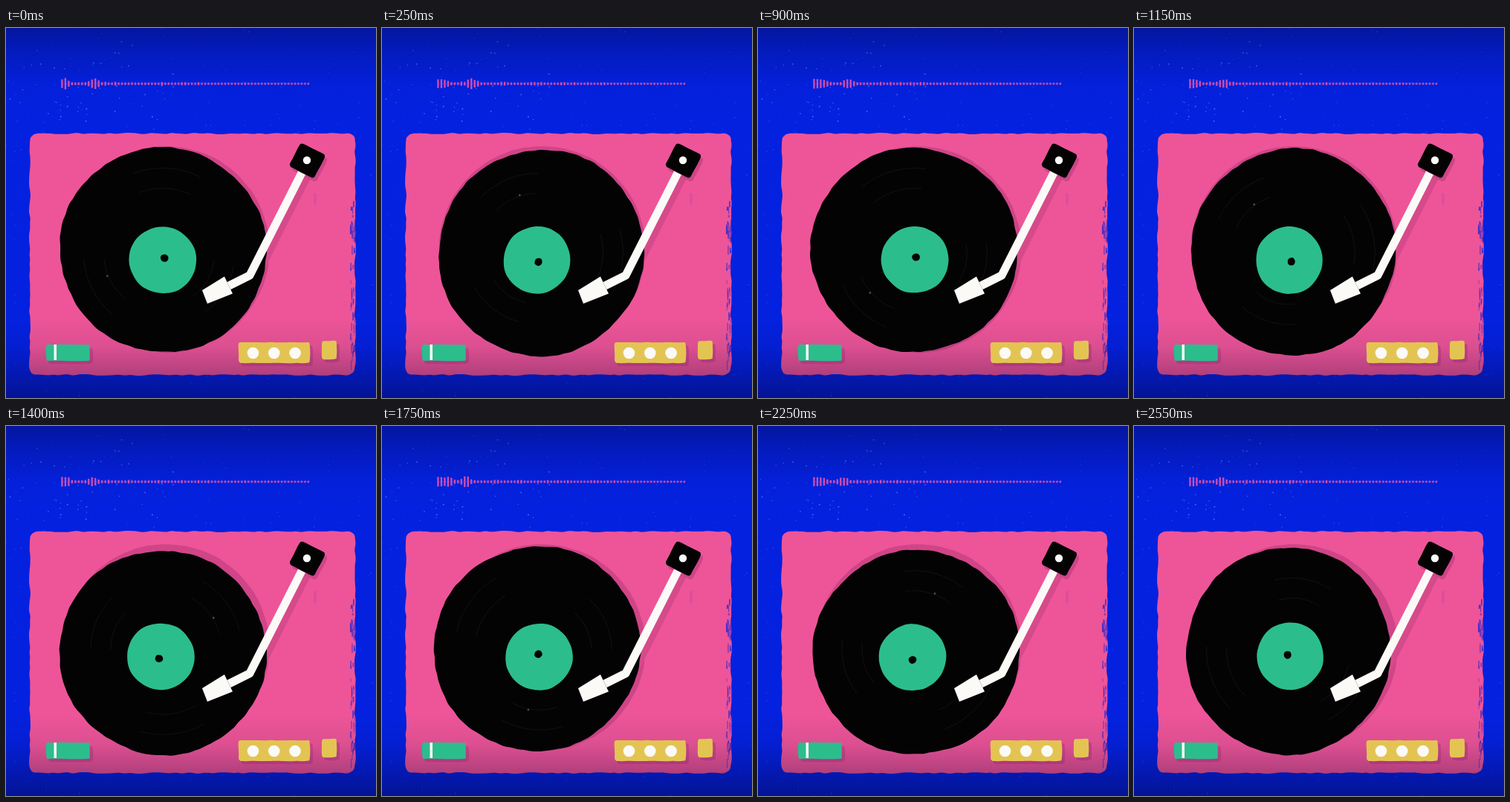
These frames come from a looping animation (498x498 px, 2.6 s). An HTML page with a canvas:

```html
<!DOCTYPE html>
<html lang="en">
<head>
<meta charset="utf-8">
<title>Turntable</title>
<style>
html, body { margin: 0; width: 100%; height: 100%; overflow: hidden; background: #0319a8; }
canvas { display: block; width: 498px; height: 498px; filter: blur(0.5px); }
</style>
</head>
<body>
<canvas id="stage" width="498" height="498"></canvas>
<script>
const SIZE = 498, LOOP = 2600, STEP = 50, TURN = 950, TAU = Math.PI * 2;
const BLUE = '#0421df', PINK = '#ed5598', GREEN = '#2cbd8d', YELLOW = '#e3c453';
const WHITE = '#fbfaf7', BLACK = '#040304', SHADE = 'rgba(130,25,105,.28)';
const ctx = document.getElementById('stage').getContext('2d');

function makeRandom(seed) {
  return () => {
    seed = (seed * 1664525 + 1013904223) >>> 0;
    return seed / 4294967296;
  };
}

function hash(a, b) {
  const v = Math.sin(a * 12.9898 + b * 78.233) * 43758.5453;
  return v - Math.floor(v);
}

function layer(paint) {
  const canvas = document.createElement('canvas');
  canvas.width = canvas.height = SIZE;
  paint(canvas.getContext('2d'));
  return canvas;
}

// Fills a closed curve running through the midpoints of the given points.
function fillCurve(c, points, color) {
  const mid = (p, q) => [(p[0] + q[0]) / 2, (p[1] + q[1]) / 2];
  c.fillStyle = color;
  c.beginPath();
  c.moveTo(...mid(points[points.length - 1], points[0]));
  points.forEach((p, i) => c.quadraticCurveTo(...p, ...mid(p, points[(i + 1) % points.length])));
  c.fill();
}

// Hand-cut rounded box: corner arcs joined by slightly uneven edges.
function roughBox(x, y, w, h, r, jitter, seed) {
  const rnd = makeRandom(seed), corners = [], out = [];
  for (let i = 0; i < 4; i++) {
    const cx = i === 0 || i === 3 ? x + w - r : x + r;
    const cy = i < 2 ? y + h - r : y + r;
    for (let k = 0; k <= 3; k++) {
      const a = (i + k / 3) * TAU / 4;
      corners.push([cx + Math.cos(a) * r, cy + Math.sin(a) * r]);
    }
  }
  corners.forEach(([px, py], i) => {
    const [nx, ny] = corners[(i + 1) % corners.length];
    const n = Math.max(1, Math.round(Math.hypot(nx - px, ny - py) / 7));
    for (let k = 0; k < n; k++) {
      out.push([
        px + (nx - px) * k / n + (rnd() - 0.5) * jitter,
        py + (ny - py) * k / n + (rnd() - 0.5) * jitter
      ]);
    }
  });
  return out;
}

// Hand-cut circle: gentle facets plus a little jitter.
function roughCircle(r, facet, jitter, seed) {
  const rnd = makeRandom(seed), n = Math.max(12, Math.round(r * 0.8));
  return Array.from({ length: n }, (_, i) => {
    const a = i / n * TAU;
    const d = r + facet * (Math.cos(2 * a - 0.7) + 0.6 * Math.cos(5 * a + 2)) + (rnd() - 0.5) * jitter;
    return [Math.cos(a) * d, Math.sin(a) * d];
  });
}

function dot(c, x, y, r, color) {
  c.fillStyle = color;
  c.beginPath();
  c.arc(x, y, r, 0, TAU);
  c.fill();
}

function speckle(c) {
  const rnd = makeRandom(71);
  for (let i = 0; i < 420; i++) {
    const x = rnd() * SIZE, y = rnd() * SIZE;
    dot(c, x, y, 0.4 + rnd() * rnd() * 0.8, `rgba(95,135,255,${0.15 + rnd() * 0.35})`);
  }
  for (let i = 0; i < 60; i++) {
    dot(c, 5 + rnd() * 225, 15 + rnd() * 120, 0.4 + rnd() * 0.6, 'rgba(150,180,255,.5)');
  }
}

function wornEdges(c) {
  const rnd = makeRandom(19);
  for (let i = 0; i < 50; i++) {
    c.fillStyle = `rgba(30,33,205,${0.3 + rnd() * 0.5})`;
    c.fillRect(463 + rnd() * 6, 230 + rnd() * 225, 0.7 + rnd() * 1.4, 3 + rnd() * 10);
  }
  c.fillStyle = 'rgba(150,50,170,.16)';
  c.fillRect(414, 222, 4, 16);
}

function paintArm(c, color, dx = 0, dy = 0) {
  c.save();
  c.translate(dx, dy);
  c.strokeStyle = color;
  c.lineWidth = 11;
  c.lineJoin = 'round';
  c.beginPath();
  c.moveTo(398, 195);
  c.lineTo(328, 333);
  c.lineTo(300, 347);
  c.stroke();
  c.fillStyle = color;
  c.beginPath();
  [[264, 353], [294, 334.5], [305, 357.5], [271, 371]].forEach(p => c.lineTo(...p));
  c.fill();
  c.restore();
}

function paintPivot(c, color, dx = 0, dy = 0) {
  c.save();
  c.translate(405.5 + dx, 178.5 + dy);
  c.rotate(0.47);
  fillCurve(c, roughBox(-19, -18, 38, 36, 4, 0.8, 14), color);
  c.restore();
}

function paintButton(c, x, y, w, h, color, seed) {
  fillCurve(c, roughBox(x + 3, y + 4, w + 1, h, 4, 0.5, seed), SHADE);
  fillCurve(c, roughBox(x, y, w, h, 3, 0.9, seed), color);
}

const back = layer(c => {
  c.fillStyle = BLUE;
  c.fillRect(0, 0, SIZE, SIZE);
  speckle(c);
  fillCurve(c, roughBox(32, 142, 438, 325, 10, 2.2, 33), PINK);
  wornEdges(c);

  c.save();
  c.translate(215.5, 298);
  fillCurve(c, roughCircle(139, 0, 1, 8), '#cf4587');
  c.restore();
  paintArm(c, '#d64a8b', 7, 5);
  paintPivot(c, '#cf4587', 3, 5);

  const fade = c.createLinearGradient(0, 0, 0, SIZE);
  [[0, 0.36], [0.06, 0.2], [0.15, 0.03], [0.22, 0], [0.78, 0], [0.86, 0.07], [0.93, 0.24], [1, 0.42]]
    .forEach(([at, alpha]) => fade.addColorStop(at, `rgba(3,0,45,${alpha})`));
  c.fillStyle = fade;
  c.fillRect(0, 0, SIZE, SIZE);

  paintButton(c, 54, 426, 59, 22, GREEN, 3);
  paintButton(c, 313, 423, 96, 28, YELLOW, 5);
  paintButton(c, 425, 421, 20, 25, YELLOW, 6);
  c.fillStyle = WHITE;
  c.fillRect(64.5, 426, 3.5, 21);
  for (let i = 0; i < 3; i++) dot(c, 332.5 + i * 28.3, 437.5, 7.8, WHITE);
});

const front = layer(c => {
  paintArm(c, WHITE);
  paintPivot(c, BLACK);
  dot(c, 405, 178, 5.2, WHITE);
});

const disc = roughCircle(138.5, 1.1, 1.6, 52);
const label = roughCircle(45.3, 0.3, 0.8, 27);
const hole = roughCircle(5.4, 0.2, 0.4, 9);

// Draws a turning part whose centre orbits around (x, y).
function spin(x, y, orbit, phase, turn, paint) {
  ctx.save();
  ctx.translate(x + Math.cos(turn + phase) * orbit, y + Math.sin(turn + phase) * orbit);
  ctx.rotate(turn);
  paint();
  ctx.restore();
}

function drawRecord(turn) {
  spin(211, 302, 3.3, -1.57, turn, () => {
    fillCurve(ctx, disc, BLACK);
    ctx.lineWidth = 0.8;
    ctx.strokeStyle = 'rgba(90,85,90,.2)';
    for (let i = 0; i < 6; i++) {
      ctx.beginPath();
      ctx.arc(0, 5, 70 + i * 9, i * 2.1, i * 2.1 + 0.8);
      ctx.stroke();
    }
    dot(ctx, -69, 46, 1.4, '#4b494c');
  });
  spin(209.7, 311.2, 1.6, 0.6, turn, () => fillCurve(ctx, label, GREEN));
  spin(209.5, 311, 4, -0.5, turn, () => fillCurve(ctx, hole, BLACK));
}

// A bass group and a wandering mid group rise out of a flickering, fading tail.
function drawWave(t) {
  const count = 75, gap = 4.48, beat = TAU * t / LOOP;
  const bassWidth = 3.7 - 1.4 * Math.cos(2 * beat);
  const midCentre = 9.5 + 1.2 * Math.sin(beat);
  ctx.fillStyle = '#d04fae';
  for (let i = 0; i < count; i++) {
    const far = 1 - i / count;
    const flicker = hash(i, t / STEP);
    const bass = Math.exp(-((i / bassWidth) ** 4)) * (0.8 + 0.2 * flicker);
    const mid = Math.exp(-(((i - midCentre) / 1.6) ** 2)) * (0.7 + 0.3 * flicker);
    const h = 2.6 + far + 10 * Math.max(bass, mid) + (flicker > 0.82 ? 2 * far : 0);
    ctx.fillRect(74.3 + i * gap, 75 - h / 2, 2.3, h);
  }
  ctx.fillStyle = 'rgba(190,70,180,.3)';
  ctx.fillRect(75, 74.3, 333, 1.4);
}

function draw(now) {
  const t = Math.floor(now % LOOP / STEP) * STEP;
  ctx.drawImage(back, 0, 0);
  drawWave(t);
  drawRecord(t / TURN * TAU + 0.15);
  ctx.drawImage(front, 0, 0);
}

const start = performance.now();
function frame() {
  draw(performance.now() - start);
  requestAnimationFrame(frame);
}
frame();
</script>
</body>
</html>
```
